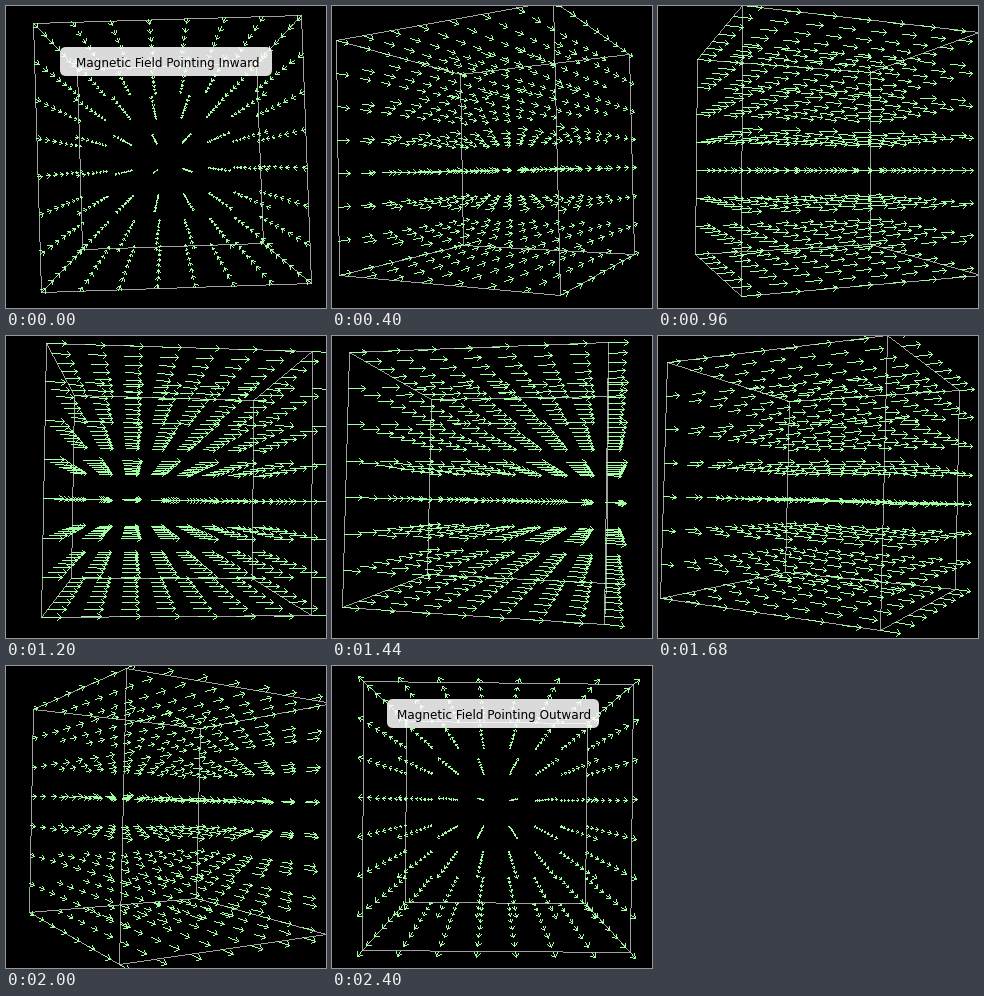
A matplotlib script that plays this animation: 320 by 302 pixels, repeating every 2480 ms.

```python
import itertools

import matplotlib.pyplot as plt
import numpy as np
from matplotlib.animation import FuncAnimation
from matplotlib.patches import FancyBboxPatch

W, H, DPI = 320, 302, 100
FRAMES, INTERVAL = 31, 80
PX = 72 / DPI

EDGE_COLOR = (160, 160, 160)
ARROW_COLOR = (160, 255, 160)

# Perspective camera: focal length, distance and screen centre
FOCAL, DIST = 545, 5.05
CX, CY = 164.4, 148.6

# Pose of the cube over time: turn in degrees, sideways and forward lean
KEYS = [0, 5, 12, 15, 20, 21, 23, 30]
TURN = [0.57, -28.2, -68.2, -85.9, -112.3, -117.9, -135.6, -179.7]
LEAN_X = [-0.032, -0.021, 0.001, 0.011, 0.026, 0.026, 0.028, 0.009]
LEAN_Z = [-0.0134, -0.033, -0.028, -0.031, -0.0243, -0.021, 0.013, 0.021]

# Cube edges join corners that differ along one axis
corners = list(itertools.product((-1, 1), repeat=3))
EDGES = np.array([(p, q) for p, q in itertools.combinations(corners, 2)
                  if sum(a != b for a, b in zip(p, q)) == 1], float)

grid = np.linspace(-1, 1, 8)
TAILS = np.array(list(itertools.product(grid, repeat=3)))
TIPS = TAILS - [0, 0, 1 / 7]

fig = plt.figure(figsize=(W / DPI, H / DPI), dpi=DPI, facecolor="black")
ax = fig.add_axes([0, 0, 1, 1])
ax.axis("off")
canvas = np.zeros((H, W, 3), np.uint8)
view = ax.imshow(canvas, extent=(0, W, H, 0), aspect="auto",
                 interpolation="nearest")
ax.set_xlim(0, W)
ax.set_ylim(H, 0)


def add_caption(text, left, top, x, y):
    box = FancyBboxPatch((left + 6, top + 6), 200, 17,
                         boxstyle="round,pad=6,rounding_size=6",
                         fc="white", ec="none", alpha=0.86, zorder=4)
    ax.add_patch(box)
    label = ax.text(x, y, text, family="DejaVu Sans", size=12 * PX,
                    color="black", ha="center", va="center_baseline", zorder=5)
    return box, label


inward = add_caption("Magnetic Field Pointing Inward", 54, 41, 161.5, 56)
outward = add_caption("Magnetic Field Pointing Outward", 55, 33, 162.5, 48)


def project(points, frame):
    """Return screen positions and scale of points on the turned cube."""
    turn = np.radians(np.interp(frame, KEYS, TURN))
    lx = np.interp(frame, KEYS, LEAN_X)
    lz = np.interp(frame, KEYS, LEAN_Z)
    x0, y0, z0 = np.moveaxis(points, -1, 0)
    x = x0 * np.cos(turn) + z0 * np.sin(turn)
    z = z0 * np.cos(turn) - x0 * np.sin(turn)
    scale = FOCAL / (DIST - z - lz * y0)
    screen = np.stack([CX + scale * (x + lx * y0),
                       CY - scale * (y0 - lx * x - lz * z)], axis=-1)
    return screen, scale


def arrow_segments(frame):
    tail, _ = project(TAILS, frame)
    tip, scale = project(TIPS, frame)
    shaft = tip - tail
    length = np.hypot(*shaft.T)[:, None]
    along = shaft / np.maximum(length, 1e-6)
    across = along[:, ::-1] * [-1, 1]
    # Heads shrink when the arrow is seen end-on
    size = np.minimum(0.028 * scale[:, None], 0.75 * length)
    barbs = [np.stack([tip, tip - size * along + side * size * across], axis=1)
             for side in (-0.8, 0.8)]
    return np.concatenate([np.stack([tail, tip], axis=1), *barbs])


def draw_lines(segments, color):
    """Draw hard one-pixel lines on the canvas."""
    start, end = np.rint(segments).swapaxes(0, 1)
    steps = np.maximum(np.abs(end - start).max(axis=1), 1)
    t = np.minimum(np.arange(steps.max() + 1) / steps[:, None], 1)[..., None]
    dots = np.rint(start[:, None] + t * (end - start)[:, None]).astype(int)
    x, y = dots.reshape(-1, 2).T
    seen = (x >= 0) & (x < W) & (y >= 0) & (y < H)
    canvas[y[seen], x[seen]] = color


def draw(frame):
    canvas[:] = 0
    draw_lines(project(EDGES, frame)[0], EDGE_COLOR)
    draw_lines(arrow_segments(frame), ARROW_COLOR)
    view.set_data(canvas)
    for part in inward:
        part.set_visible(frame <= 2)
    for part in outward:
        part.set_visible(frame >= 28)
    return view, *inward, *outward


anim = FuncAnimation(fig, draw, frames=FRAMES, interval=INTERVAL,
                     repeat=True, repeat_delay=0)
plt.show()
```
